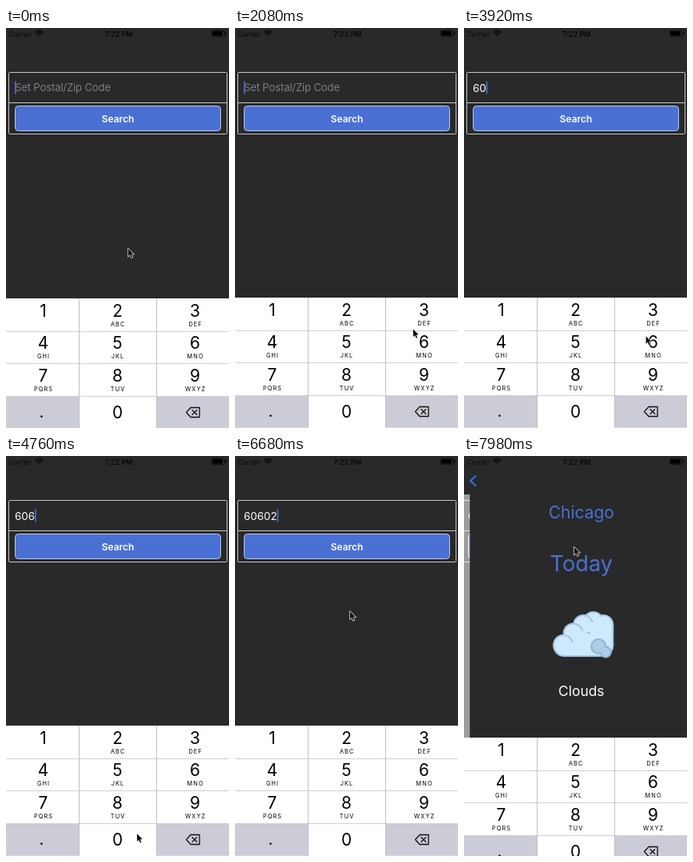
These frames come from a looping animation (279 px wide and 500 px high, 8 s). An HTML page with a canvas:

```html
<!DOCTYPE html>
<html lang="en">
<head>
<meta charset="utf-8">
<title>Postal code search</title>
<style>
html, body { margin: 0; width: 100%; height: 100%; overflow: hidden; background: #292929; }
canvas { display: block; width: 279px; height: 500px; }
</style>
</head>
<body>
<canvas id="stage"></canvas>
<script>
const W = 279, H = 500, LOOP = 8000, NAV = 48;
const BG = '#292929', BLUE = '#4a70d4', GREY = '#cbccd6', EDGE = '#c6c6c6';
const FONT = 'Inter, Roboto, sans-serif';
const canvas = document.getElementById('stage');
const ctx = canvas.getContext('2d');
const dpr = window.devicePixelRatio || 1;
canvas.width = W * dpr;
canvas.height = H * dpr;

// Typing: one digit every PACE ms
const CODE = '60602', FIRST = 2300, PACE = 885, HOLD = 90;
const BUTTON_DOWN = 7020, BUTTON_UP = 7160, PUSH = 7440;
const typedAt = i => FIRST + i * PACE;
const typedCount = t => [...CODE].filter((_, i) => typedAt(i) <= t).length;

// Pointer: rests at each spot, then glides to the next
const GLIDE = 720;
const SPOTS = { 6: [228, 385], 0: [162, 475], 2: [156, 355] };
const STOPS = [
  { at: 840, spot: [129, 222] },
  ...[...CODE].map((d, i) => ({ at: typedAt(i) - 120, spot: SPOTS[d] })),
  { at: BUTTON_DOWN - 60, spot: [138, 114] }
];

// Keypad grid
const CENTERS = [46.5, 139.5, 236.5];
const LETTERS = ['', 'ABC', 'DEF', 'GHI', 'JKL', 'MNO', 'PQRS', 'TUV', 'WXYZ'];
const TOP = 337, KEY_W = 97, KEY_H = 40.7;
const keyX = col => col * KEY_W - 6;
const keyY = row => Math.round(TOP + row * KEY_H);

const clamp = v => Math.max(0, Math.min(1, v));
const ramp = (t, a, b) => clamp((t - a) / (b - a));
const smooth = v => v * v * (3 - 2 * v);
const mix = (a, b, v) => a + (b - a) * v;

function rect(x, y, w, h, color) {
  ctx.fillStyle = color;
  ctx.fillRect(x, y, w, h);
}

function text(s, x, y, size, color, { weight = 400, align = 'center', track = 0 } = {}) {
  ctx.font = `${weight} ${size}px ${FONT}`;
  ctx.letterSpacing = track + 'px';
  ctx.textAlign = align;
  ctx.fillStyle = color;
  ctx.fillText(s, x, y);
}

function line(points, color, width, close) {
  ctx.beginPath();
  points.forEach(([x, y]) => ctx.lineTo(x, y));
  if (close) ctx.closePath();
  ctx.strokeStyle = color;
  ctx.lineWidth = width;
  ctx.stroke();
}

function box(x, y, w, h, r) {
  ctx.beginPath();
  ctx.roundRect(x, y, w, h, r);
}

function faded(alpha, paint) {
  ctx.save();
  ctx.globalAlpha = alpha;
  paint();
  ctx.restore();
}

function statusBar() {
  text('Carrier', 3, 10.7, 9, '#0a0a0a', { align: 'left' });
  text('7:22 PM', 141, 10.7, 9, '#080808', { weight: 600 });
  ctx.strokeStyle = '#080808';
  ctx.lineWidth = 1.3;
  for (let r = 2.2; r < 8; r += 2.4) {
    ctx.beginPath();
    ctx.arc(41.5, 10.5, r, -Math.PI * 0.77, -Math.PI * 0.23);
    ctx.stroke();
  }
  box(257.5, 3, 16, 7.5, 1.5);
  ctx.lineWidth = 0.7;
  ctx.stroke();
  rect(258.5, 4, 12.5, 5.5, '#000');
  rect(274.3, 5.3, 1.2, 3, '#000');
}

function caretAlpha(t) {
  const n = typedCount(t);
  const c = (t - (n ? typedAt(n - 1) : 0)) % 1500;
  return c < 1200 ? 1 - ramp(c, 840, 1030) : ramp(c, 1360, 1500);
}

function searchView(t) {
  box(3.5, 55.5, 273, 77, 1);
  ctx.strokeStyle = EDGE;
  ctx.lineWidth = 1;
  ctx.stroke();
  line([[3.5, 93.5], [276.5, 93.5]], EDGE, 1);

  const code = CODE.slice(0, typedCount(t));
  let end = 11;
  if (code) {
    text(code, 11, 79.7, 13.4, '#fff', { align: 'left' });
    end += ctx.measureText(code).width;
  } else {
    text('Set Postal/Zip Code', 11, 79, 13.2, '#7c7c7c', { align: 'left', track: -0.2 });
  }
  faded(caretAlpha(t), () => rect(end, 66.5, 1.6, 16, BLUE));

  const held = ramp(t, BUTTON_DOWN, BUTTON_DOWN + 40) - ramp(t, BUTTON_UP, BUTTON_UP + 220);
  box(11.5, 97.5, 257, 31, 4);
  ctx.fillStyle = BLUE;
  ctx.fill();
  faded(held, () => {
    ctx.fillStyle = '#4667b8';
    ctx.fill();
  });
  ctx.strokeStyle = '#b9c9ec';
  ctx.lineWidth = 1;
  ctx.stroke();
  faded(1 - held * 0.25, () => text('Search', 140, 117.5, 11.9, '#fff', { weight: 600 }));
}

const greyKey = (col, row) => rect(keyX(col), keyY(row), KEY_W, KEY_H, GREY);

function backspace(x, y) {
  ctx.save();
  ctx.translate(x, y);
  ctx.lineJoin = ctx.lineCap = 'round';
  line([[-11, 0], [-5.5, -6], [5.5, -6], [5.5, 6], [-5.5, 6]], '#111', 1.3, true);
  line([[-3.5, -2.8], [2.1, 2.8]], '#111', 1.3);
  line([[2.1, -2.8], [-3.5, 2.8]], '#111', 1.3);
  ctx.restore();
}

function keyboard(t) {
  ctx.save();
  ctx.translate(0, 1 - ramp(t, 20, 80) + 15 * ramp(t, 7870, 7940));
  rect(0, TOP, W, 4 * KEY_H + 2, '#fff');
  greyKey(0, 3);
  greyKey(2, 3);

  [...CODE].forEach((d, i) => {
    if (t < typedAt(i) - HOLD || t >= typedAt(i)) return;
    if (d === '0') greyKey(1, 3);
    else greyKey((d - 1) % 3, Math.floor((d - 1) / 3));
  });

  for (let row = 1; row < 4; row++) rect(0, keyY(row), W, 1, '#cfd0d3');
  for (let col = 1; col < 3; col++) rect(keyX(col), TOP, 1, 4 * KEY_H, '#c0c1c5');

  LETTERS.forEach((label, i) => {
    const x = CENTERS[i % 3], y = 360 + 40.4 * Math.floor(i / 3);
    text(String(i + 1), x, y, 20.8, '#000');
    text(label, x + 0.6, y + 11.8, 7.3, '#000', { track: 1.1 });
  });
  text('0', CENTERS[1], 487.2, 20.8, '#000');
  text('.', 44.5, 485.8, 20.8, '#000');
  backspace(236.6, 479.5);
  ctx.restore();
}

function disc(x, y, r, color) {
  ctx.beginPath();
  ctx.arc(x, y, r, 0, Math.PI * 2);
  ctx.fillStyle = color;
  ctx.fill();
}

function cloud() {
  const rim = '#a5c6e2', fill = '#cde9fb';
  const lumps = Array.from({ length: 5 }, (_, i) =>
    [117 + 12.5 * i, 236 - 29 * Math.sin(i * Math.PI / 6)]);

  for (const [grow, color] of [[2, rim], [0, fill]]) {
    for (const [x, y] of lumps) disc(x, y, 11 + grow, color);
    box(106 - grow, 225 - grow, 72 + 2 * grow, 24 + 2 * grow, 12 + grow);
    ctx.fill();
    rect(150, 211, 28 + grow, 26, color);
    rect(125, 222, 40, 20, fill);
  }

  ctx.strokeStyle = rim;
  ctx.lineWidth = 2;
  ctx.lineCap = 'round';
  for (const [x, y] of lumps.slice(0, 3)) {
    ctx.beginPath();
    ctx.arc(x, y, 12, -Math.PI / 2, -0.3);
    ctx.stroke();
  }
  for (const [grow, color] of [[1, '#8fb3d4'], [-1, '#abcde8']]) {
    disc(161, 238, 9 + grow, color);
    disc(170, 245, 6.5 + grow, color);
  }
}

function weatherView(t) {
  const k = 0.0102 * (t - PUSH);
  const rest = (1 + k) * Math.exp(-k);

  faded((1 - rest) * 0.55, () => rect(0, NAV, W, H, '#fff'));
  rect(0, 0, W, NAV, BG);

  ctx.save();
  ctx.translate(W * rest, 0);
  rect(0, NAV, W, H, BG);
  text('Chicago', 139.5, 78, 21, BLUE);
  text('Today', 139.5, 143.5, 27.2, BLUE);
  cloud();
  text('Clouds', 139.5, 300, 17.4, '#fff');
  ctx.restore();

  faded(smooth(1 - rest), () => line([[15, 24.5], [8.2, 31], [15, 37.5]], '#2f6fe4', 2.2));
}

function pointer(t) {
  let x = 153, y = 276;
  for (const { at, spot } of STOPS) {
    const e = smooth(ramp(t, at - GLIDE, at));
    x = mix(x, spot[0], e);
    y = mix(y, spot[1], e);
  }
  ctx.save();
  ctx.translate(x, y);
  ctx.scale(0.88, 0.88);
  line([[0, 0], [0, 10.6], [2.4, 8.4], [4.2, 12.5], [6, 11.7], [4.3, 7.8], [7.6, 7.6]], '#f0f0f0', 1.5, true);
  ctx.fillStyle = '#111';
  ctx.fill();
  ctx.restore();
}

function draw(t) {
  ctx.setTransform(dpr, 0, 0, dpr, 0, 0);
  rect(0, 0, W, H, BG);
  ctx.save();
  ctx.translate(-6 * ramp(t, PUSH, LOOP - 40), 0);
  searchView(t);
  ctx.restore();
  if (t >= PUSH) weatherView(t);
  statusBar();
  keyboard(t);
  pointer(t);
}

const start = performance.now();
function tick() {
  draw((performance.now() - start) % LOOP);
  requestAnimationFrame(tick);
}
tick();
</script>
</body>
</html>
```
